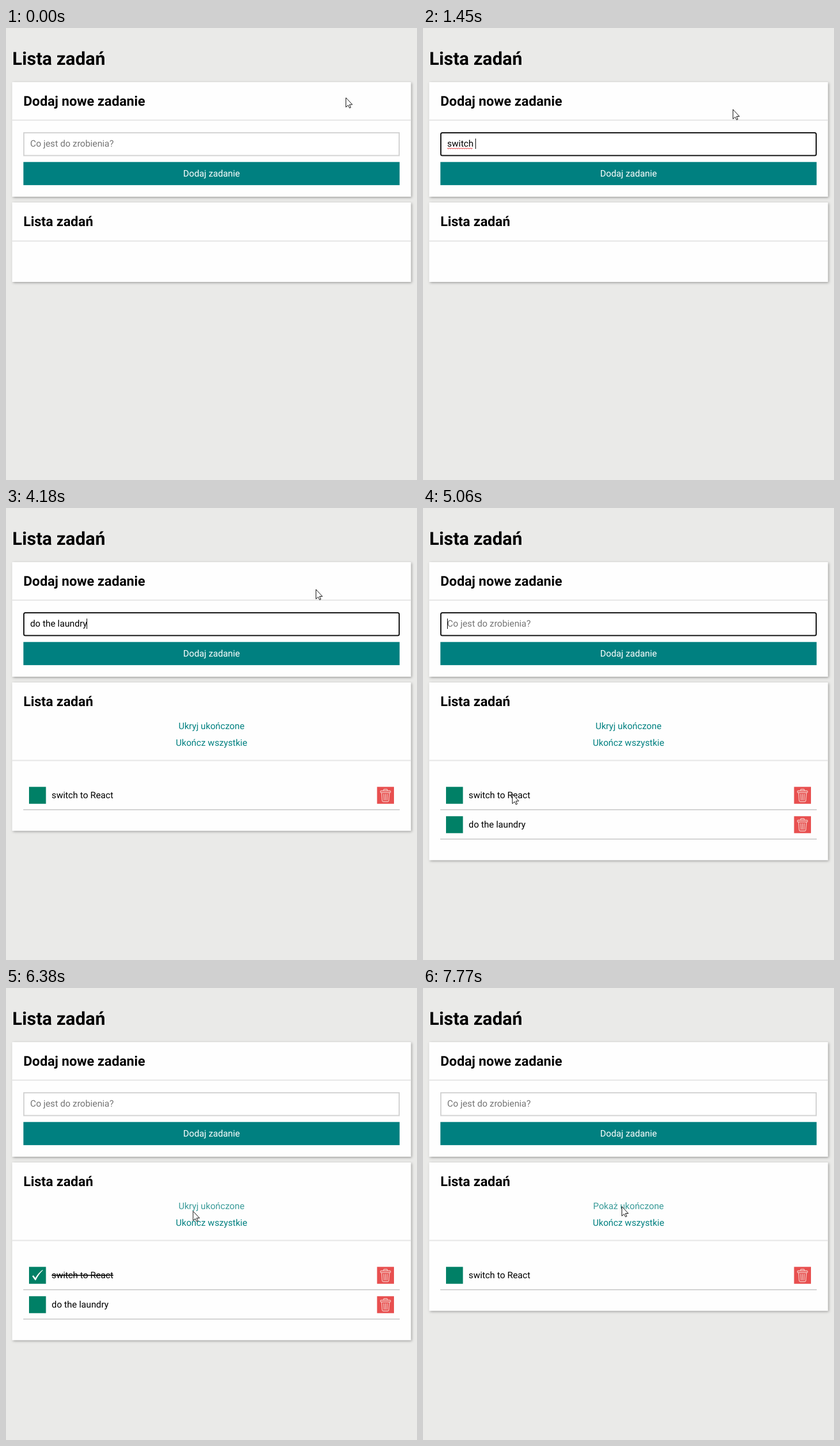
These frames come from a looping animation (714x785 px, 8 s). An HTML page:

```html
<!DOCTYPE html>
<html lang="pl">
<head>
<meta charset="utf-8">
<title>Lista zadań</title>
<style>
  html, body { margin: 0; width: 100%; height: 100%; overflow: hidden; background: #eaeae8; }
  svg { display: block; width: 714px; height: 785px; font: 400 15.68px Roboto, sans-serif; }
  text { white-space: pre; text-rendering: geometricPrecision; }
  .h1 { font-size: 31.36px; font-weight: 700; }
  .h2 { font-size: 23.52px; font-weight: 700; }
  .mid { text-anchor: middle; }
  .panel { fill: #fefefe; filter: url(#shadow); }
  .rule { fill: #e6e6e6; }
</style>
</head>
<body>
<svg viewBox="0 0 714 785">
  <defs>
    <filter id="shadow" filterUnits="userSpaceOnUse" x="0" y="80" width="714" height="560">
      <feDropShadow dx="1.5" dy="1.5" stdDeviation="2.3" flood-color="#000" flood-opacity=".34"/>
    </filter>
    <g id="bin">
      <rect x="644.6" y="484.3" width="29.4" height="29.4" fill="#e84f4f"/>
      <g fill="none" stroke="#f3bfba" stroke-width="1.4" stroke-linecap="round" stroke-linejoin="round">
        <path d="M656 491v-1.5q0-1 1-1h4.500q1 0 1 1v1.500"/>
        <rect x="650.500" y="491.200" width="17.500" height="3" rx="1.200"/>
        <path d="M652.500 494.500l1 13.500q.2 2 2 2h7.500q1.800 0 2-2l1-13.500"/>
        <path d="M656.300 497l.4 10M659.300 497v10M662.300 497l-.4 10"/>
      </g>
    </g>
  </defs>

  <rect width="714" height="785" fill="#eaeae8"/>
  <text class="h1" x="11" y="64">Lista zadań</text>

  <rect class="panel" x="10.800" y="94" width="692.500" height="199"/>
  <text class="h2" x="30.300" y="134.500">Dodaj nowe zadanie</text>
  <rect class="rule" x="10.800" y="159" width="692.500" height="2"/>
  <rect id="field" x="31" y="182" width="652" height="39.500" fill="#fff" stroke-width="2"/>
  <text id="typed" x="42" y="206" xml:space="preserve"></text>
  <path id="wave" fill="none" stroke="#e8282d"/>
  <rect id="caret" y="192" width="1" height="18"/>
  <rect x="30.250" y="232.700" width="653.500" height="40.200" fill="#008080"/>
  <text class="mid" x="357" y="258" fill="#fff">Dodaj zadanie</text>

  <rect id="list" class="panel" x="10.800" y="303" width="692.500" height="138"/>
  <text class="h2" x="30.300" y="343.700">Lista zadań</text>
  <rect id="listRule" class="rule" x="10.800" width="692.500" height="2"/>
  <g id="links" fill="#008080">
    <text id="toggle" class="mid" x="357" y="384"></text>
    <text class="mid" x="357" y="413">Ukończ wszystkie</text>
  </g>
  <g id="rows"></g>

  <path id="arrow" d="M0 0V16.500L3.800 13L6.300 18L8.500 17L6.200 12H11.200Z" fill="#fff" stroke="#111"/>
  <path id="beam" d="M-3 -8q3 0 3 2q0-2 3-2M0 -6V6M-3 8q3 0 3-2q0 2 3 2" fill="none" stroke="#111"/>
</svg>
<script>
const LOOP = 8000;
const $ = id => document.getElementById(id);
const show = (el, on) => el.setAttribute('visibility', on ? 'visible' : 'hidden');
const set = (el, attrs) => { for (const k in attrs) el.setAttribute(k, attrs[k]); };
const within = (t, a, b) => t >= a && t < b;
const ramp = (t, a, b) => Math.min(1, Math.max(0, (t - a) / (b - a)));
const easeOut = k => 1 - (1 - k) ** 3;

// Moments of user actions
const FOCUS = 410, ADD1 = 2600, ADD2 = 4430, DONE1 = 5420, HIDE = 5950,
      UNHIDE = 6300, UNDO1 = 6710, DONE2 = 6900, HIDE2 = 7740;

// Typed chunks with the times of their first and last key
const task1 = [['swit', 910, 1160], ['ch ', 1300, 1450], ['to ', 1590, 1740], ['React', 1920, 2320]];
const task2 = [['do the lau', 3160, 3860], ['ndry', 3970, 4180]];
const fullText = chunks => chunks.map(c => c[0]).join('');

function typedAt(t, chunks) {
  return chunks.map(([text, a, b]) =>
    t < a ? '' : text.slice(0, 1 + Math.floor(ramp(t, a, b) * (text.length - 1) + 1e-6))).join('');
}

// Pointer glides: start, end, x, y
const glides = [
  [70, 300, 573, 324], [300, 660, 538, 141],
  [4860, 5240, 110, 538], [5240, 5420, 57, 503], [5440, 5950, 327, 386],
  [6380, 6700, 57, 502], [6740, 6880, 56, 551], [6940, 7520, 343, 367], [7560, 7740, 345, 379]
];

function pointer(t) {
  let x = 590.5, y = 121;
  for (const [a, b, toX, toY] of glides) {
    const k = easeOut(ramp(t, a, b));
    x += (toX + .5 - x) * k;
    y += (toY + .5 - y) * k;
  }
  return [x, y];
}

function row(item, i) {
  const tick = item.done
    ? '<path d="M45.500 500.500L47.500 499L51 503.500Q56 495 63.500 489.500L64 490.300Q56.500 497.500 51.800 507.500H50.500Z" fill="#fff"/>' : '';
  const strike = item.done ? ' text-decoration="line-through"' : '';
  return `<g transform="translate(0 ${i * 51})">
    <rect x="40" y="484.300" width="29.400" height="29.400" fill="#008066"/>${tick}
    <text x="79.300" y="504"${strike}>${item.text}</text>
    <use href="#bin"/><rect x="30" y="523" width="654" height="2" fill="#d3d3d3"/></g>`;
}

let wave = 'M42 208.500';
for (let x = 44; x <= 87; x += 2) wave += `L${x} ${x % 4 ? 208.5 : 210}`;
$('wave').setAttribute('d', wave);

let rowKey = null;
function drawList(t) {
  const items = [];
  if (t >= ADD1) items.push({ text: fullText(task1), done: within(t, DONE1, UNDO1) });
  if (t >= ADD2) items.push({ text: fullText(task2), done: t >= DONE2 });
  const hidden = within(t, HIDE, UNHIDE) || t >= HIDE2;
  const shown = items.filter(item => !(hidden && item.done));
  const any = items.length > 0;
  set($('list'), { height: any ? 206.5 + 51 * shown.length : 138 });
  set($('listRule'), { y: any ? 437.5 : 369 });
  show($('links'), any);
  $('toggle').textContent = (hidden ? 'Pokaż' : 'Ukryj') + ' ukończone';
  const glow = ramp(t, 5740, 6000) - ramp(t, 6400, 6600) + ramp(t, 7300, 7560);
  set($('toggle'), { fill: `rgb(${58 * glow}, ${128 + 27 * glow}, ${128 + 25 * glow})` });
  const key = JSON.stringify(shown);
  if (key !== rowKey) {
    rowKey = key;
    $('rows').innerHTML = shown.map(row).join('');
  }
}

function drawField(t) {
  const focus = within(t, FOCUS, DONE1);
  set($('field'), { stroke: focus ? '#101010' : '#d3d3d3', rx: focus ? 2.5 : 0 });
  const value = t < ADD1 ? typedAt(t, task1) : t < ADD2 ? typedAt(t, task2) : '';
  const typed = $('typed');
  typed.textContent = value || 'Co jest do zrobienia?';
  set(typed, { fill: value ? '#000' : '#757575' });
  show($('wave'), t < ADD1 && value.length > 6);
  show($('caret'), focus && !within(t, ADD1, 2880) && !within(t, ADD2, 4720));
  set($('caret'), { x: value ? Math.floor(42 + typed.getComputedTextLength()) : 42 });
}

function draw(t) {
  drawField(t);
  drawList(t);
  const [x, y] = pointer(t);
  const overField = x > 30 && x < 684 && y > 181 && y < 222;
  for (const id of ['arrow', 'beam']) {
    set($(id), { transform: `translate(${x} ${y})` });
    show($(id), (id === 'beam') === overField);
  }
}

const start = performance.now();
function frame() {
  draw((performance.now() - start) % LOOP);
  requestAnimationFrame(frame);
}
frame();
</script>
</body>
</html>
```
